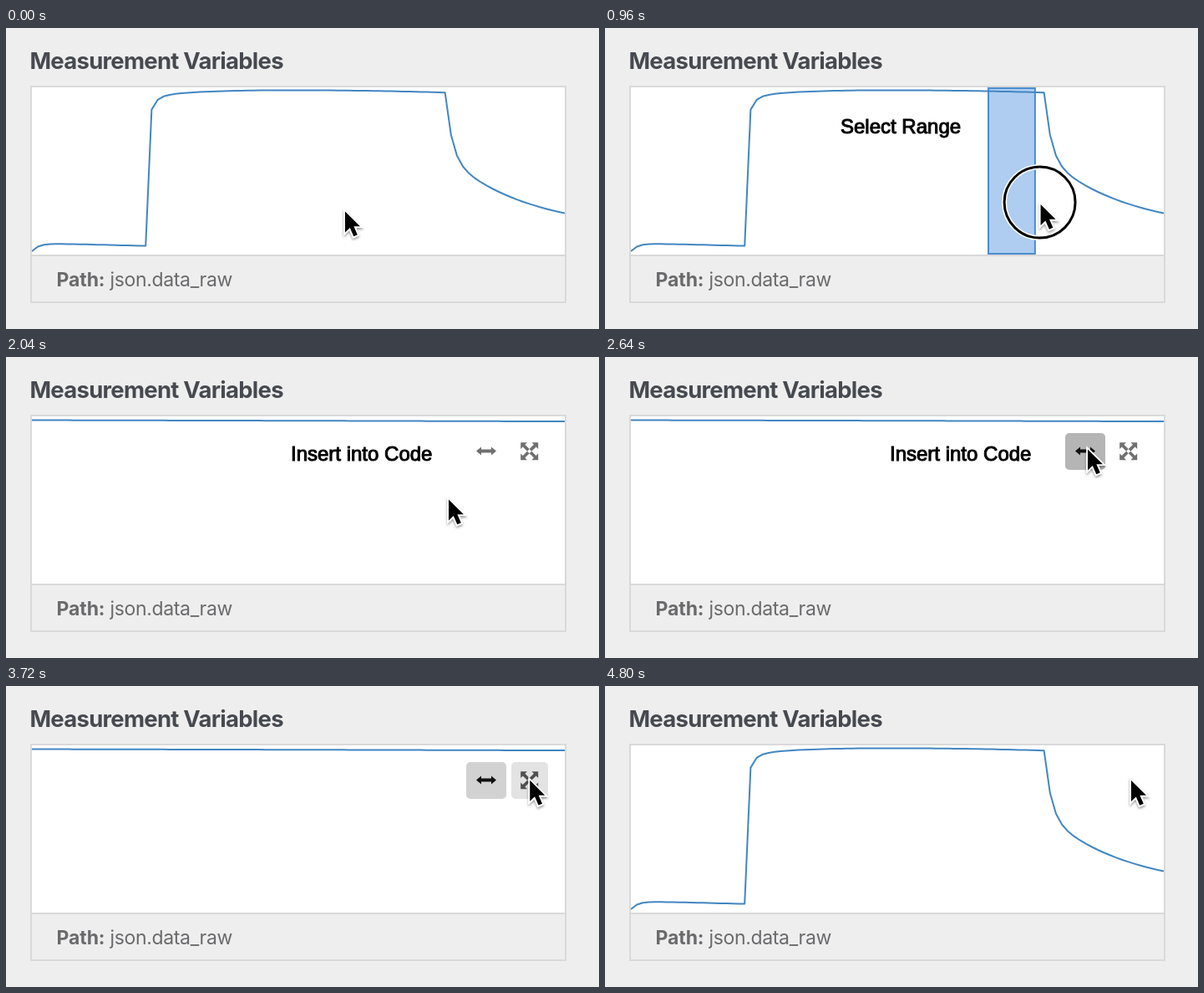
Write an HTML page that moves like this. It is 710 px wide and 360 px high and loops after 4.86 s.

```html
<!DOCTYPE html>
<html lang="en">
<head>
<meta charset="utf-8">
<title>Measurement Variables</title>
<style>
  html, body { margin: 0; width: 100%; height: 100%; overflow: hidden; background: #eee; }
  svg { display: block; }
  .ui { font-family: Inter, Roboto, sans-serif; }
  .title { font-size: 27.5px; font-weight: 700; letter-spacing: -.75px; fill: #464a50; }
  .path { font-size: 23px; letter-spacing: -.35px; fill: #6a6a6d; }
  .path tspan { font-weight: 700; letter-spacing: -.1px; }
  .note { font: 24px "Liberation Sans", Arial, sans-serif; stroke: #000; stroke-width: 1; }
  .curve { fill: none; stroke: #4286c2; stroke-width: 2; stroke-linejoin: round; }
</style>
</head>
<body>
<svg width="710" height="360" viewBox="0 0 710 360">
  <defs>
    <filter id="soft" x="-50%" y="-50%" width="200%" height="200%">
      <feDropShadow dx="0" dy="2" stdDeviation="1.5" flood-opacity=".4"/>
    </filter>
    <clipPath id="plot"><rect x="31" y="71" width="638" height="200"/></clipPath>
  </defs>

  <text class="ui title" x="28.500" y="49">Measurement Variables</text>
  <rect x="30" y="70" width="640" height="258" fill="#eee" stroke="#d9d9d9" stroke-width="2"/>
  <rect x="31" y="71" width="638" height="200" fill="#fff"/>
  <path d="M31 272H669" stroke="#d9d9d9" stroke-width="2"/>
  <text class="ui path" x="60.500" y="309"><tspan>Path:</tspan> json.data_raw</text>

  <rect id="range" x="459" y="72" height="198" fill="#afcdf1" stroke="#4a8dd0" stroke-width="2"/>
  <g clip-path="url(#plot)"><polyline id="curve" class="curve"/></g>

  <g id="tools">
    <rect id="spanBtn" x="551" y="91" width="48" height="44" rx="5"/>
    <path id="spanIcon" d="M563 112.500l6-5v3h12v-3l6 5-6 5v-3h-12v3z"/>
    <rect id="resetBtn" x="605" y="91" width="44" height="44" rx="5"/>
    <g id="resetIcon" transform="translate(626.7 112.7)"></g>
  </g>

  <text id="selectNote" class="note" x="282" y="126">Select Range</text>
  <text id="insertNote" class="note" x="341" y="124">Insert into Code</text>

  <g id="pointer">
    <g id="ring" fill="none">
      <circle r="42.500" stroke="#fff" stroke-width="6"/>
      <circle r="42.500" stroke="#000" stroke-width="3"/>
    </g>
    <path d="M1 2.500V27.500L6.800 22 11.300 32.200 15.800 30.300 11.400 20.300H19z"
      stroke="#fff" stroke-width="3.600" paint-order="stroke" filter="url(#soft)"/>
  </g>
</svg>
<script>
const LOOP = 4860, STEP = 60;
const LEFT = 31, WIDTH = 638, SAMPLES = 89;
const DRAG_FROM = 458, DRAG_TO = 523;
const $ = id => document.getElementById(id);

// warm-up, step to a plateau, then a fast and a slow decay
function signal(x) {
  const fade = (from, size, span) => size * Math.exp((from - x) / span);
  if (x < 170) return 257.3 + .024 * (x - LEFT) + fade(LEFT, 9.7, 8);
  if (x < 527) return 74.3 + 75e-6 * (x - 330) ** 2 + fade(175, 13.4, 6) + fade(175, 6.5, 40);
  return 242.9 - fade(526, 89, 100) - fade(526, 76.6, 7.8);
}

function plot(from, to) {
  return Array.from({ length: SAMPLES + 1 }, (_, i) => {
    const p = i / SAMPLES;
    return `${LEFT + WIDTH * p},${signal(from + (to - from) * p)}`;
  }).join(" ");
}
const fullView = plot(LEFT, LEFT + WIDTH);
const zoomView = plot(DRAG_FROM, DRAG_TO);

// one arm of the expand icon, turned four ways
$("resetIcon").innerHTML = [0, 90, 180, 270].map(a =>
  `<path transform="rotate(${a})" d="M-10.500-10.500h7.800l-2.600 2.600 5.300 5.300-2.600 2.600-5.300-5.300-2.600 2.600z"/>`
).join("");

const home = [405, 217];
const moves = [
  { from: 0, to: 540, end: [DRAG_FROM, 197] },
  { from: 720, to: 1080, end: [DRAG_TO, 209] },
  { from: 1560, to: 2040, end: [529, 168] },
  { from: 2100, to: 2580, end: [577, 108] },
  { from: 3420, to: 3900, end: [629, 110.5] }
];

function place(t) {
  return moves.reduce((pos, { from, to, end }) => {
    const p = Math.min(1, Math.max(0, (t - from) / (to - from)));
    const eased = 1 - (1 - p) ** 3;
    return pos.map((v, i) => v + (end[i] - v) * eased);
  }, home);
}

const show = (id, on) => $(id).setAttribute("display", on ? "inline" : "none");
const fill = (id, color) => $(id).setAttribute("fill", color);

function draw(t) {
  const within = (a, b) => t >= a && t < b;
  const [x, y] = place(t);
  $("pointer").setAttribute("transform", `translate(${x} ${y})`);
  show("ring", within(540, 1560) || within(2700, 3060) || within(4200, 4500));

  // the selection trails the pointer by one step
  const trail = place(t - STEP)[0] - DRAG_FROM - 1;
  $("range").setAttribute("width", Math.max(0, trail));
  show("range", within(780, 1560));

  const zoomed = within(1560, 4380);
  $("curve").setAttribute("points", zoomed ? zoomView : fullView);
  show("tools", zoomed);
  show("selectNote", within(540, 1560));
  show("insertNote", within(1800, 3060));

  const pressed = within(2580, 3060), over = within(2400, 2580);
  fill("spanBtn", pressed ? "#b5b5b5" : over ? "#e3e3e3" : t >= 3060 ? "#d2d2d3" : "none");
  fill("spanIcon", t >= 2580 ? "#111" : "#707070");

  const aim = t >= 3540;
  fill("resetBtn", t >= 4200 ? "#b5b5b5" : aim ? "#e3e3e4" : "none");
  fill("resetIcon", aim ? "#505050" : "#707070");
}

const start = performance.now();
function tick() {
  const t = (performance.now() - start) % LOOP;
  draw(Math.floor(t / STEP) * STEP);
  requestAnimationFrame(tick);
}
draw(0);
requestAnimationFrame(tick);
</script>
</body>
</html>
```
